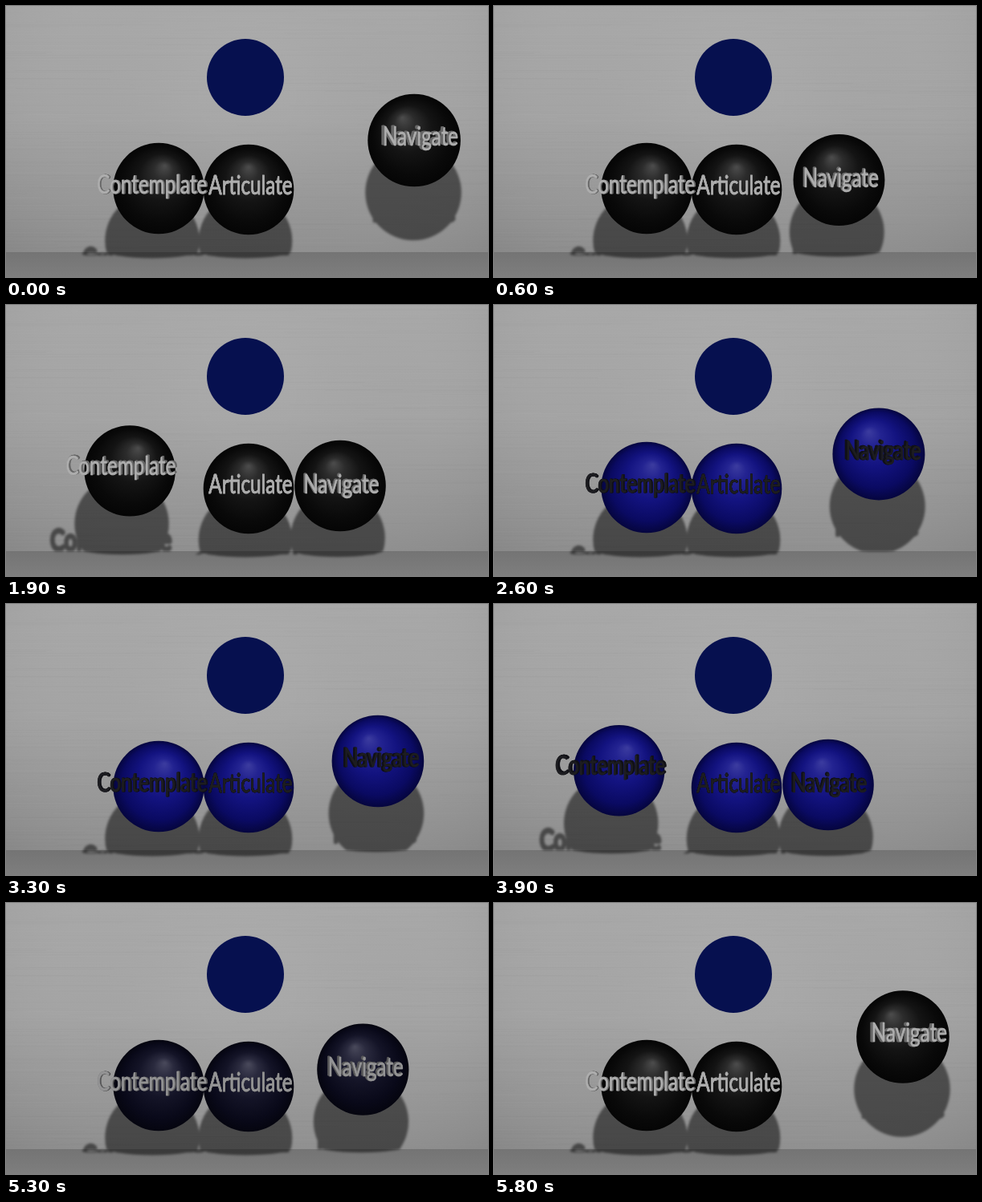
These frames come from a looping animation (600 px wide and 338 px high, 5900 ms). An HTML page with a canvas:

```html
<!DOCTYPE html>
<html lang="en">
<head>
<meta charset="utf-8">
<title>Contemplate, Articulate, Navigate</title>
<style>
html, body { margin: 0; width: 100%; height: 100%; overflow: hidden; background: #999; }
canvas { display: block; width: 600px; height: 338px; }
</style>
</head>
<body>
<canvas id="stage" width="600" height="338"></canvas>
<script>
const W = 600, H = 338, LOOP = 5900, FLOOR = 307;
const ctx = document.getElementById('stage').getContext('2d');

function layer() {
  const c = document.createElement('canvas');
  c.width = W;
  c.height = H;
  return c;
}

const wall = layer(), shade = layer();
const lerp = (a, b, k) => a + (b - a) * k;
const rgb = c => `rgb(${c.map(Math.round).join()})`;
const mix = (a, b, k) => rgb(a.map((v, i) => lerp(v, b[i], k)));

function ease(t, from, to) {
  const u = Math.min(1, Math.max(0, (t - from) / (to - from)));
  return u * u * (3 - 2 * u);
}

// One hump: swing out during a..b, back during c..d
const hump = (t, a, b, c, d) => ease(t, a, b) - ease(t, c, d);

function random(seed) {
  return () => (seed = (seed * 16807) % 2147483647) / 2147483647;
}

function paintWall() {
  const g = wall.getContext('2d');
  let fill = g.createLinearGradient(0, 0, 0, FLOOR);
  fill.addColorStop(0, '#a8a8a8');
  fill.addColorStop(0.45, '#a4a4a4');
  fill.addColorStop(1, '#909090');
  g.fillStyle = fill;
  g.fillRect(0, 0, W, FLOOR);

  fill = g.createRadialGradient(300, 110, 60, 300, 110, 400);
  fill.addColorStop(0, 'rgba(255,255,255,.04)');
  fill.addColorStop(0.5, 'rgba(128,128,128,0)');
  fill.addColorStop(1, 'rgba(0,0,0,.09)');
  g.fillStyle = fill;
  g.fillRect(0, 0, W, FLOOR);

  const rnd = random(41);
  for (let i = 0; i < 420; i++) {
    const tone = rnd() < 0.5 ? 0 : 255;
    g.fillStyle = `rgba(${tone},${tone},${tone},${0.005 + rnd() * 0.014})`;
    g.fillRect(rnd() * 700 - 150, rnd() * FLOOR, 60 + rnd() * 260, 1);
  }

  fill = g.createLinearGradient(0, FLOOR, 0, H);
  fill.addColorStop(0, '#747474');
  fill.addColorStop(1, '#7e7e7e');
  g.fillStyle = fill;
  g.fillRect(0, FLOOR, W, H - FLOOR);

  // Emblem on the wall
  g.fillStyle = '#06104f';
  g.beginPath();
  g.arc(298, 89, 48, 0, 7);
  g.fill();
}

function pose(t) {
  const left = hump(t, 640, 1445, 1450, 2260) + hump(t, 3550, 4360, 4310, 5110);
  const right = 1 - ease(t, -50, 805) + hump(t, 2104, 2904, 2880, 3725) + ease(t, 5005, 5810);
  return [
    { word: 'Contemplate', x: 190 - 86 * left, y: 227.5 - 49.5 * left, r: 56.7,
      tx: -8.5 - 7 * left, ty: 6.5 - 4 * left, sx: -8 - 5 * left, sy: 65 + 2 * left },
    { word: 'Articulate', x: 302, y: 229, r: 56.3, tx: 2.5, ty: 6, sx: -4, sy: 64 },
    { word: 'Navigate', x: 416 + 93 * right, y: 225.5 - 58.5 * right, r: 56.8 + right,
      tx: 1.5 + 6.5 * right, ty: 9 - 3 * right, sx: -3 + 2 * right, sy: 65 }
  ];
}

function lettering(g) {
  g.font = '33px Lato, "Open Sans", sans-serif';
  g.textAlign = 'center';
  g.textBaseline = 'alphabetic';
  g.lineJoin = 'round';
}

// Slim lettering, the same proportion for every word
function label(g, word, x, y, size, weight) {
  g.save();
  g.translate(x, y);
  g.scale(size * 0.735, size);
  g.lineWidth = weight;
  g.strokeText(word, 0, 0);
  g.fillText(word, 0, 0);
  g.restore();
}

function shadowShapes(g, balls) {
  for (const b of balls) {
    g.beginPath();
    g.arc(b.x + b.sx, b.y + b.sy, b.r + 2, 0, 7);
    g.fill();
    label(g, b.word, b.x + b.tx - 8 + b.sx * 0.4, b.y + b.ty + 94, 1.1, 4);
  }
}

function drawShadows(balls) {
  const g = shade.getContext('2d');
  g.clearRect(0, 0, W, H);
  g.fillStyle = g.strokeStyle = '#000';
  lettering(g);

  g.save();
  g.beginPath();
  g.rect(0, 0, W, FLOOR);
  g.clip();
  shadowShapes(g, balls);
  g.restore();

  // The floor foreshortens what falls below the wall
  g.save();
  g.beginPath();
  g.rect(0, FLOOR, W, H - FLOOR);
  g.clip();
  g.translate(0, FLOOR);
  g.scale(1, 0.17);
  g.translate(0, -FLOOR);
  shadowShapes(g, balls);
  g.restore();

  ctx.save();
  ctx.globalAlpha = 0.5;
  ctx.filter = 'blur(1.5px)';
  ctx.drawImage(shade, 0, 0);
  ctx.restore();
}

function drawBall(b, blue) {
  const hx = b.x + (300 - b.x) * 0.07, hy = b.y - 28;
  const fill = ctx.createRadialGradient(hx, hy, 1, b.x, b.y, b.r);
  fill.addColorStop(0, mix([74, 74, 74], [58, 58, 158], blue));
  fill.addColorStop(0.2, mix([44, 44, 44], [35, 35, 145], blue));
  fill.addColorStop(0.5, mix([20, 20, 20], [19, 19, 128], blue));
  fill.addColorStop(0.82, mix([9, 9, 9], [10, 10, 98], blue));
  fill.addColorStop(1, mix([5, 5, 5], [5, 5, 62], blue));
  ctx.fillStyle = fill;
  ctx.beginPath();
  ctx.arc(b.x, b.y, b.r, 0, 7);
  ctx.fill();
}

function drawWord(b, blue) {
  const x = b.x + b.tx, y = b.y + b.ty, depth = (300 - b.x) * 0.016;
  const side = mix([104, 104, 104], [19, 19, 24], blue);
  const face = mix([174, 174, 174], [29, 29, 33], blue);
  for (let k = 5; k >= 0; k--) {
    ctx.fillStyle = ctx.strokeStyle = k ? side : face;
    label(ctx, b.word, x + depth * k / 5, y - k * 0.1, 1, 0.7);
  }
}

function draw(t) {
  const balls = pose(t);
  const blue = hump(t, 2130, 2500, 5030, 5400);
  ctx.drawImage(wall, 0, 0);
  drawShadows(balls);
  lettering(ctx);
  balls.forEach(b => drawBall(b, blue));
  balls.forEach(b => drawWord(b, blue));
}

const start = performance.now();
function tick() {
  const t = (performance.now() - start) % LOOP;
  draw(Math.floor(t / 100) * 100);
  requestAnimationFrame(tick);
}

paintWall();
tick();
</script>
</body>
</html>
```
